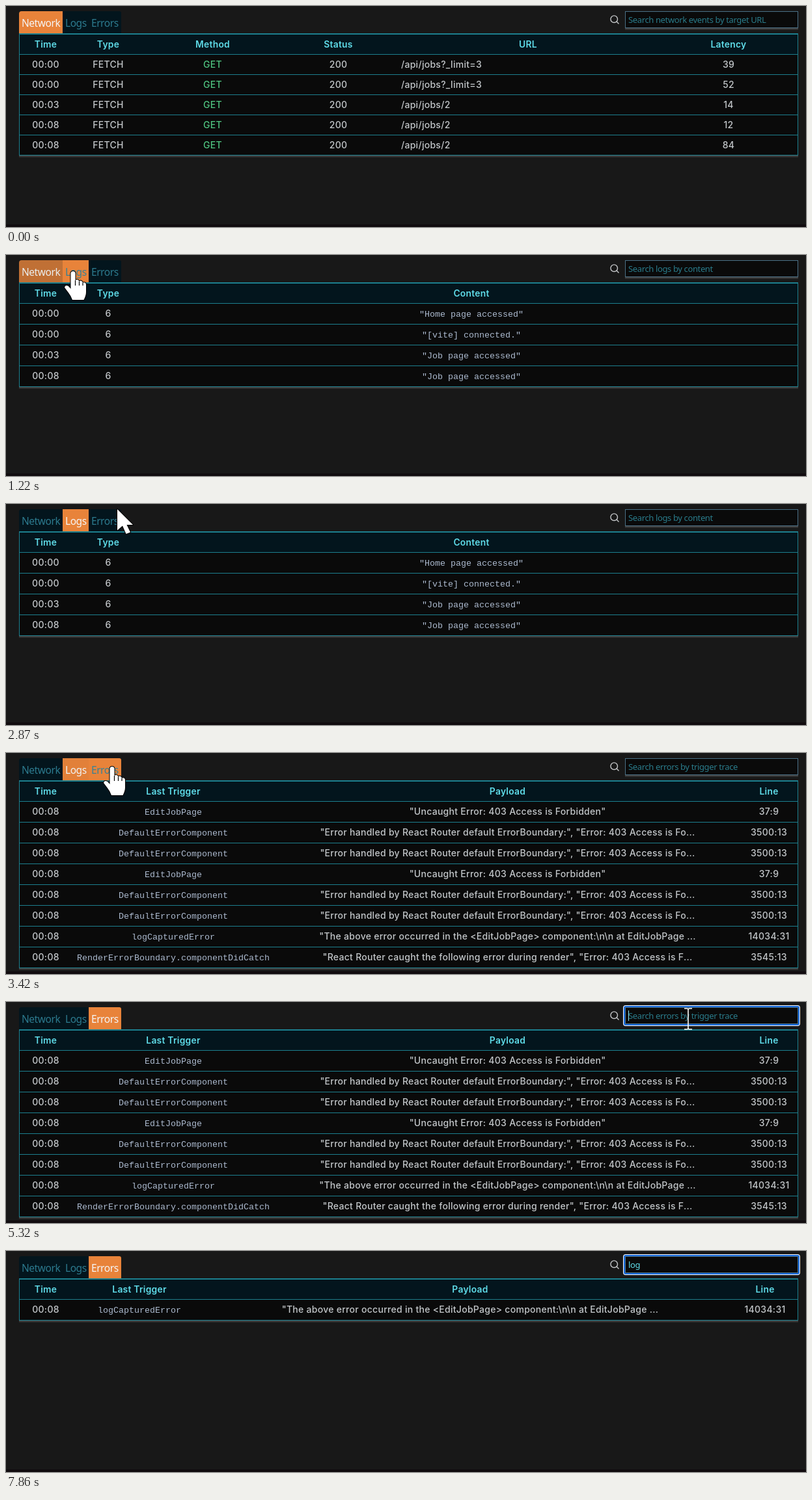
Recreate the animation shown at these times as an HTML page with a canvas. Size 1229x340 px, loop 8.39 s.

```html
<!DOCTYPE html>
<html lang="en">
<head>
<meta charset="utf-8">
<title>Event panel</title>
<style>
html, body { margin: 0; width: 100%; height: 100%; overflow: hidden; background: #181818; }
canvas { display: block; width: 1229px; height: 340px; }
</style>
</head>
<body>
<canvas id="stage" width="1229" height="340"></canvas>
<script>
const ctx = document.getElementById('stage').getContext('2d');
const LOOP = 8390;

const TEAL = '#1c7f8e', CYAN = '#5fdce9', BODY = '#c3c7ca', MONO = '#acbacf', GREEN = '#4fc480';
const ORANGE = [232, 131, 58], NAVY = [3, 21, 29], WHITE = [245, 245, 245], DIM = [44, 122, 142];

const FONTS = {
  head: ['600 13.8px Inter, sans-serif', '0.28px'],
  cell: ['500 14px Inter, sans-serif', '0.28px'],
  mono: ['13.33px "Liberation Mono", monospace', '0px'],
  tab: ['15.5px "Noto Sans", sans-serif', '-0.45px'],
  input: ['13px "Noto Sans", sans-serif', '-0.37px']
};

const forbidden = ['00:08', 'EditJobPage', '"Uncaught Error: 403 Access is Forbidden"', '37:9'];
const handled = ['00:08', 'DefaultErrorComponent',
  '"Error handled by React Router default ErrorBoundary:", "Error: 403 Access is Fo...', '3500:13'];
const logged = ['00:08', 'logCapturedError',
  '"The above error occurred in the <EditJobPage> component:\\n\\n at EditJobPage ...', '14034:31'];
const caught = ['00:08', 'RenderErrorBoundary.componentDidCatch',
  '"React Router caught the following error during render", "Error: 403 Access is F...', '3545:13'];
const errors = [forbidden, handled, handled, forbidden, handled, handled, logged, caught];

const fetchRow = (time, url, ms) => [time, 'FETCH', 'GET', '200', url, ms];
const logRow = (time, text) => [time, '6', `"${text}"`];

const network = {
  step: 31, hint: 'Search network events by target URL',
  heads: ['Time', 'Type', 'Method', 'Status', 'URL', 'Latency'],
  cols: [61, 157, 317.5, 510.5, 802, 1110],
  rows: [
    fetchRow('00:00', '/api/jobs?_limit=3', '39'),
    fetchRow('00:00', '/api/jobs?_limit=3', '52'),
    fetchRow('00:03', '/api/jobs/2', '14'),
    fetchRow('00:08', '/api/jobs/2', '12'),
    fetchRow('00:08', '/api/jobs/2', '84')
  ]
};
const logs = {
  step: 32, hint: 'Search logs by content', mono: 2,
  heads: ['Time', 'Type', 'Content'],
  cols: [61, 157, 715],
  rows: [
    logRow('00:00', 'Home page accessed'),
    logRow('00:00', '[vite] connected.'),
    logRow('00:03', 'Job page accessed'),
    logRow('00:08', 'Job page accessed')
  ]
};
const errorTable = (rows, cols) => ({
  step: 32, hint: 'Search errors by trigger trace', mono: 1,
  heads: ['Time', 'Last Trigger', 'Payload', 'Line'], cols, rows
});
const wide = errorTable(errors, [61, 257, 770.5, 1172]);
const narrowCols = [61, 205, 713, 1166];
const fewer = errorTable(errors.slice(0, 7), narrowCols);
const single = errorTable([logged], narrowCols);

// Pointer path: time, x, y
const path = [
  [470, 150, -40], [800, 118, 10], [1080, 103, 25], [1330, 103, 25],
  [1820, 146, -40], [1950, 146, -40], [2400, 195, -6], [2800, 172, 4],
  [2870, 171, 8], [3180, 165, 18], [3420, 163, 21], [3720, 163, 21],
  [4170, 316, 24], [4490, 316, 24], [4500, 321, 24],
  [4800, 640, 37], [5180, 1048, 26], [6050, 1048, 26]
];

const ramp = (t, a, b) => Math.min(1, Math.max(0, (t - a) / (b - a)));
const ease = k => k * k * (3 - 2 * k);
const mix = (a, b, k) => `rgb(${a.map((v, i) => Math.round(v + (b[i] - v) * k))})`;

function rect(x, y, w, h, color) {
  ctx.fillStyle = color;
  ctx.fillRect(x, y, w, h);
}

function box(x, y, w, h, r, color) {
  ctx.fillStyle = color;
  ctx.beginPath();
  ctx.roundRect(x, y, w, h, r);
  ctx.fill();
}

// Soft light edge below a panel
function shade(x, y, w) {
  for (let i = 0; i < 3; i++) rect(x, y + i, w, 1, `rgba(150, 150, 150, ${0.36 - i * 0.11})`);
}

function text(str, x, y, font, color, align = 'center') {
  [ctx.font, ctx.letterSpacing] = FONTS[font];
  ctx.textAlign = align;
  ctx.fillStyle = color;
  ctx.fillText(str, x, y);
}

function drawTabs(t) {
  const toLogs = ramp(t, 1150, 1550), toErrors = ramp(t, 3410, 3800);
  const tabs = [
    ['Network', 20, 67, [4, 0, 0, 0], 1 - toLogs, 1 - ramp(t, 1200, 1550)],
    ['Logs', 87, 40, 0, ramp(t, 900, 1150) - toErrors, ramp(t, 1200, 1500) - toErrors],
    ['Errors', 127, 50, [0, 3, 0, 0], ramp(t, 3000, 3250), ramp(t, 3400, 3700)]
  ];
  for (const [label, x, w, r, fill, ink] of tabs) {
    box(x, 8, w, 34, r, mix(NAVY, ORANGE, fill));
    text(label, x + 4, 32, 'tab', mix(DIM, WHITE, ink), 'left');
  }
}

function drawTable(table) {
  const { step, heads, cols, rows, mono } = table;
  const end = 74 + step * rows.length;
  rect(20, 43, 1197, end - 42, '#0a0a0a');
  shade(20, end + 1, 1197);
  rect(20, 42, 1197, 32, '#03151d');
  rect(20, 42, 1197, 2, TEAL);
  rect(20, 43, 1, end - 42, TEAL);
  rect(1216, 43, 1, end - 42, TEAL);
  for (let y = 74; y <= end; y += step) rect(20, y, 1197, 1, TEAL);

  heads.forEach((h, i) => text(h, cols[i], 64, 'head', CYAN));
  rows.forEach((row, r) => row.forEach((cell, i) => {
    const y = 95 + r * step;
    if (i === mono) text(cell, cols[i], y, 'mono', MONO);
    else if (cell.startsWith('/')) text(cell, 607, y, 'cell', BODY, 'left');
    else text(cell, cols[i], y, 'cell', cell === 'GET' ? GREEN : BODY);
  }));
}

function drawSearch(t, hint) {
  ctx.strokeStyle = '#c4c6c8';
  ctx.lineWidth = 1.4;
  ctx.beginPath();
  ctx.arc(934.2, 20.2, 5.3, 0, Math.PI * 2);
  ctx.moveTo(938, 24);
  ctx.lineTo(941.5, 27.5);
  ctx.stroke();

  shade(951, 34, 266);
  const focused = t >= 5320;
  if (focused) {
    box(948, 5, 272, 32, 4, '#ffffff');
    box(949, 6, 270, 30, 3, '#1264d8');
  }
  rect(951, 8, 266, 26, '#4a7086');
  rect(952, 9, 264, 24, '#0a0a0a');

  const typed = t < 6050 ? '' : t < 6250 ? 'l' : t < 6390 ? 'lo' : 'log';
  if (typed) text(typed, 956, 26, 'input', CYAN, 'left');
  else text(hint, 956, 26, 'input', '#2a7c8b', 'left');

  const blink = t < 5720 || (t >= 6050 && t < 6250) || (t >= 6390 && t < 6850) || (t >= 7400 && t < 7860);
  if (focused && blink) rect(typed === 'log' ? 973 : typed ? 960 : 956, 13, 1, 16, '#8fe6ee');
}

const arrow = new Path2D('M0 0V32.5L8 25.5L13.5 38L20 35.5L14.5 24H24Z');
const hand = new Path2D('M-3.5 3.5Q-3.5 0 0 0Q3.5 0 3.5 3.5V14Q7.5 11 9.5 15.5Q13 13 15 17.5' +
  'Q20 16 20 21V32Q20 37 16.5 44H-1Q-3 38 -7 33L-13 25Q-12 20 -7 23L-3.5 27Z');
const folds = new Path2D('M3.5 14V22M9.5 15.5V22M15 17.5V22');
const beam = new Path2D('M-6 -16H-2Q0 -16 0 -14Q0 -16 2 -16H6M0 -14V14M-6 16H-2Q0 16 0 14Q0 16 2 16H6');

function drawPointer(t) {
  const i = path.findIndex(p => p[0] > t);
  if (i < 1) return;
  const [a, b] = [path[i - 1], path[i]];
  const k = ease(ramp(t, a[0], b[0]));
  const x = a[1] + (b[1] - a[1]) * k, y = a[2] + (b[2] - a[2]) * k;
  ctx.save();
  ctx.translate(x, y);
  ctx.lineJoin = 'round';
  if (x > 951 && y > 8 && y < 34) {
    ctx.strokeStyle = '#fff';
    ctx.lineWidth = 1.6;
    ctx.stroke(beam);
  } else {
    const onTab = x < 177 && y > 9 && y < 42;
    const shape = onTab ? hand : arrow;
    ctx.strokeStyle = '#000';
    ctx.lineWidth = 2;
    ctx.stroke(shape);
    ctx.fillStyle = '#fff';
    ctx.fill(shape);
    ctx.lineWidth = 1.2;
    if (onTab) ctx.stroke(folds);
  }
  ctx.restore();
}

function draw(now) {
  const t = now % LOOP;
  const table = t < 1200 ? network : t < 3400 ? logs : t < 6320 ? wide : t < 6390 ? fewer : single;
  rect(0, 0, 1229, 340, '#181818');
  rect(0, 336, 1229, 4, '#110c0f');
  drawTabs(t);
  drawTable(table);
  drawSearch(t, table.hint);
  drawPointer(t);
}

let start;
function frame(now) {
  start ??= now;
  draw(now - start);
  requestAnimationFrame(frame);
}
draw(0);
requestAnimationFrame(frame);
</script>
</body>
</html>
```
